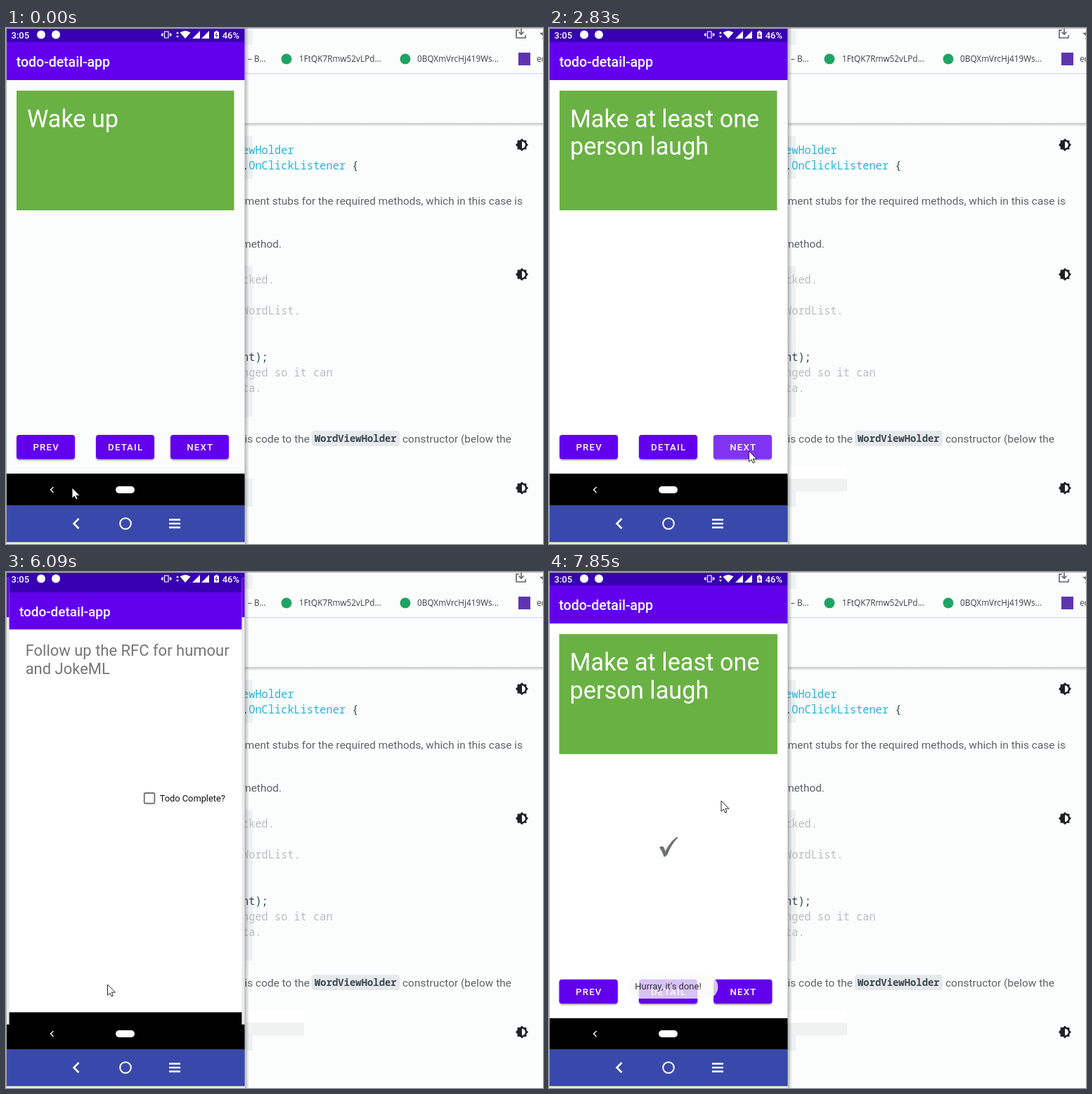
Write an HTML page that moves like this. It is 764 px wide and 733 px high and loops after 8000 ms.

```html
<!DOCTYPE html>
<html lang="en">
<head>
<meta charset="utf-8">
<title>Todo app demo</title>
<style>
  html, body { margin: 0; width: 100%; height: 100%; overflow: hidden; background: #fafdfc; }
  svg { display: block; width: 764px; height: 733px; font-family: Roboto, sans-serif; }
  .body { font-size: 15.45px; fill: #5f6368; }
  .code { font: 500 15.33px "Noto Sans Mono", monospace; fill: #37474f; white-space: pre; }
  .code .type { fill: #27b4dc; }
  .code .note { fill: #b9bdc0; }
  .chip { font-size: 13.9px; font-weight: 600; }
  .tab { font: 11.8px "Open Sans", sans-serif; fill: #3c4043; }
  .title { font-size: 19.5px; font-weight: 500; fill: #fff; }
  .todo { font-size: 34.2px; fill: #fff; }
  .btn text { font-size: 13.2px; font-weight: 500; letter-spacing: 1.18px; text-anchor: middle; fill: #fff; }
  .status { font-size: 13px; font-weight: 500; fill: #fff; }
  .window { transform-origin: 170px 353px; }
  .end { text-anchor: end; }
</style>
</head>
<body>
<svg viewBox="0 0 764 733">
  <defs>
    <clipPath id="glass"><rect x="1" y="1" width="338.5" height="677"/></clipPath>
    <linearGradient id="side"><stop stop-color="#000" stop-opacity=".26"/><stop offset="1" stop-color="#000" stop-opacity="0"/></linearGradient>
    <linearGradient id="under" x2="0" y2="1"><stop stop-color="#000" stop-opacity=".22"/><stop offset="1" stop-color="#000" stop-opacity="0"/></linearGradient>
    <filter id="lift" x="-10%" y="-20%" width="120%" height="160%"><feDropShadow dx="0" dy="1.5" stdDeviation="1.2" flood-opacity=".35"/></filter>
    <path id="contrast" d="M20 15.31 23.31 12 20 8.69V4h-4.69L12 .69 8.69 4H4v4.69L.69 12 4 15.31V20h4.69L12 23.31 15.31 20H20zM12 18V6c3.31 0 6 2.69 6 6s-2.69 6-6 6z" fill="#202124"/>
    <g id="bars">
      <rect y="-60" width="340" height="80" fill="#3700b3"/>
      <rect y="20" width="340" height="54" fill="#6200ee"/>
      <rect y="633" width="340" height="90" fill="#000"/>
      <text class="title" x="14.800" y="54.800">todo-detail-app</text>
    </g>
  </defs>

  <!-- Web page behind the phone -->
  <rect width="764" height="733" fill="#fafdfc"/>
  <rect width="764" height="1" fill="#b4b7b7"/>
  <rect x="330" y="3" width="21" height="21" rx="2" fill="#eff2f3"/>
  <g fill="none" stroke="#5f6368" stroke-width="1.6">
    <path d="M730 3h-4v11h13v-4M733 1v8m-3.500-3.500 3.500 3.500 3.500-3.500"/>
    <path d="m768 3-2 4-5 .6 4 3.400-1 5"/>
  </g>
  <g class="tab">
    <text x="344" y="48">– B...</text>
    <circle cx="399" cy="44" r="7.500" fill="#1fa463"/>
    <text x="417" y="48">1FtQK7Rmw52vLPd...</text>
    <circle cx="568" cy="44" r="7.500" fill="#1fa463"/>
    <text x="585" y="48">0BQXmVrcHj419Ws...</text>
    <rect x="729" y="35" width="17" height="18" fill="#5f35ae"/>
    <text x="755" y="48">ec</text>
  </g>
  <rect x="340" y="64" width="424" height="1.500" fill="#dcdfe4"/>
  <rect x="340" y="135" width="424" height="5" fill="url(#under)"/>
  <g fill="#eef1f3">
    <rect x="330" y="153" width="21" height="61"/>
    <rect x="330" y="338" width="21" height="214"/>
    <rect x="330" y="640" width="21" height="40"/>
  </g>
  <g id="strip">
    <rect x="340" y="622" width="84" height="18.500" fill="#fff"/>
    <rect x="340" y="640.500" width="84" height="18" fill="#f0f2f1"/>
  </g>
  <g class="code">
    <text class="type" x="336" y="178.500">ewHolder</text>
    <text x="336" y="200.500">.<tspan class="type">OnClickListener</tspan> {</text>
    <text class="note" x="336" y="362.500">cked.</text>
    <text class="note" x="336" y="406.500">WordList.</text>
    <text x="336" y="472.500">nt);</text>
    <text class="note" x="336" y="494.500">nged so it can</text>
    <text class="note" x="336" y="516.500">ta.</text>
  </g>
  <g class="body">
    <text class="end" x="735" y="251">ement stubs for the required methods, which in this case is</text>
    <text class="end" x="392" y="312">method.</text>
    <text class="end" x="432" y="588.500">is code to the</text>
    <rect x="435" y="572" width="125" height="22" rx="4" fill="#e6e9eb"/>
    <text class="code chip" x="439" y="588">WordViewHolder</text>
    <text x="564" y="588.500">constructor (below the</text>
  </g>
  <use href="#contrast" transform="translate(724.400 156.400) scale(.8)"/>
  <use href="#contrast" transform="translate(724.400 340.400) scale(.8)"/>
  <use href="#contrast" transform="translate(724.400 643.900) scale(.8)"/>

  <!-- Phone -->
  <rect x="340" width="6" height="733" fill="url(#side)"/>
  <rect y="730" width="340" height="3" fill="url(#under)"/>
  <rect width="340" height="730.500" fill="#a9adad"/>
  <g clip-path="url(#glass)">
    <g id="main" class="window">
      <rect id="paper" width="340" height="640"/>
      <use href="#bars"/>
      <rect x="15" y="89" width="309.500" height="170" fill="#6ab144"/>
      <text class="todo" id="line1" x="30" y="140.500"></text>
      <text class="todo" id="line2" x="30" y="180.300"></text>
      <path id="tick" fill="#6f7070" d="M157 391.500q3-3 5.500-1.500 1.800 2 2.800 6.500 7-13 15.500-19.500l3.500-.5q-9 8-16 25-2.500 3-5 3-1.500-7-6.300-13z"/>
      <g id="buttons"></g>
    </g>
    <rect id="dim" width="340" height="678"/>
    <g id="detail" class="window">
      <rect width="340" height="640" fill="#fff"/>
      <use href="#bars"/>
      <g font-size="22.600" fill="#757575">
        <text x="23.700" y="113">Follow up the RFC for humour</text>
        <text x="23.700" y="139.700">and JokeML</text>
      </g>
      <circle id="halo" cx="205" cy="320.500" r="18" fill="#03dac5" opacity=".2"/>
      <rect id="box" x="197.500" y="313" width="15" height="15" rx="1.500" stroke-width="2"/>
      <path id="boxTick" d="m200 320.500 3.500 3.500 7-7" fill="none" stroke="#fff" stroke-width="2"/>
      <text x="220" y="325.200" font-size="13.200" fill="#111">Todo Complete?</text>
    </g>
    <g id="toast">
      <rect x="113" y="573" width="127.500" height="33" rx="16.500" fill="#fafafa" opacity=".78"/>
      <text x="169.500" y="592.500" font-size="13" text-anchor="middle" fill="#333">Hurray, it's done!</text>
    </g>

    <g class="status">
      <text x="7.500" y="14.500">3:05</text>
      <circle cx="50" cy="9.500" r="6"/>
      <circle cx="71" cy="9.500" r="6"/>
      <path d="M225.500 5h5.500v9h-5.500zM223 7v5m10.500-5v5M221.500 8v3m13.500-3v3" fill="none" stroke="#fff" stroke-width="1.200"/>
      <path d="m244 5 2 3h-4zm0 9-2-3h4zM247.500 6.500q7.500-5 15 0L255 15zM276 4v11h-11zM289 4v11h-11z"/>
      <path d="M298 4h3v1.500h2V15h-7V5.500h2z"/>
      <path d="m300 7-2 3.500h3l-2 3" fill="none" stroke="#3700b3"/>
      <text class="end" x="332" y="14.500">46%</text>
    </g>
    <path d="m67.500 652-4 4 4 4" fill="none" stroke="#fff" stroke-width="1.400"/>
    <rect x="156" y="651" width="27" height="10" rx="5" fill="#fff"/>
  </g>
  <rect x="1" y="678" width="338.500" height="52" fill="#3949ab"/>
  <g fill="none" stroke="#fff" stroke-width="2.500">
    <path d="m103.500 697-7 7 7 7"/>
    <circle cx="170" cy="704" r="7.800" stroke-width="2"/>
    <path d="M232 698.500h16M232 704h16M232 709.500h16"/>
  </g>
  <path id="cursor" d="M0 0V15.200L3.400 12l2.300 5 2.300-1-2.200-4.800H11z" fill="#fff" stroke="#111" stroke-width=".9"/>
</svg>

<script>
const LOOP = 8000;
const $ = id => document.getElementById(id);
const parts = Object.fromEntries(
  [...document.querySelectorAll('svg [id]')].map(el => [el.id, el]));

// Last entry whose start time has been reached.
const at = (track, t) => track.findLast(k => t >= k[0]);

const buttons = [['PREV', 15], ['DETAIL', 128], ['NEXT', 234]];
$('buttons').innerHTML = buttons.map(([label, x]) => `
  <g class="btn">
    <rect x="${x}" y="578" width="83" height="34.500" rx="4" fill="#6200ee" filter="url(#lift)"/>
    <text x="${x + 42.2}" y="600.300">${label}</text>
    <rect class="ripple" x="${x}" y="578" width="83" height="34.500" rx="4" fill="#fff"/>
  </g>`).join('');
const ripples = document.querySelectorAll('.ripple');

// Tap start, button index
const taps = [[1790, 2], [2680, 2], [3420, 2], [4590, 0], [5780, 1]];

const todos = [
  [0, 'Wake up', ''],
  [1940, 'Eat breakfast', ''],
  [2830, 'Make at least one', 'person laugh'],
  [3570, 'Go to sleep', ''],
  [4740, 'Make at least one', 'person laugh']
];

const pointer = [
  [0, 94, 653], [130, 112, 650], [280, 150, 640], [430, 190, 629],
  [570, 226, 619], [720, 255, 611], [860, 272, 606], [1010, 280, 604], [1330, 284.5, 601],
  [3860, 225, 602], [4000, 120, 603], [4150, 68, 603],
  [5050, 70, 599], [5200, 92, 596], [5350, 128, 589], [5500, 144.5, 586],
  [6380, 160, 540], [6530, 195, 450], [6670, 228, 375], [6820, 240.5, 344],
  [6970, 243, 331], [7120, 245, 325]
];

// Time, main scale, dim, detail scale, detail opacity
const windows = [
  [0, 1, 0, 1, 0],
  [5930, 1.01, .04, .9, .5],
  [6090, 1.035, .08, .973, 1],
  [6240, 1, 0, 1, 1],
  [7700, 1.04, 0, .93, .25],
  [7850, 1.003, 0, 1, 0]
];

const show = (el, on) => el.setAttribute('visibility', on ? 'visible' : 'hidden');

function draw(t) {
  const [, x, y] = at(pointer, t);
  parts.cursor.setAttribute('transform', `translate(${x} ${y})`);

  const [, first, second] = at(todos, t);
  parts.line1.textContent = first;
  parts.line2.textContent = second;
  parts.paper.setAttribute('fill', t < 2680 ? '#fafdfc' : '#fff');
  show(parts.strip, t >= 430);

  const tap = at(taps, t);
  const age = tap ? t - tap[0] : LOOP;
  const glow = age < 150 ? .1 : age < 300 ? .2 : 0;
  ripples.forEach((r, i) => r.setAttribute('opacity', tap && tap[1] === i ? glow : 0));

  const [, mainScale, dim, detailScale, alpha] = at(windows, t);
  parts.main.style.transform = `scale(${mainScale})`;
  parts.dim.setAttribute('opacity', dim);
  parts.detail.style.transform = `scale(${detailScale})`;
  parts.detail.setAttribute('opacity', alpha);

  const done = t >= 7400;
  parts.box.setAttribute('fill', done ? '#03dac5' : 'none');
  parts.box.setAttribute('stroke', done ? '#03dac5' : '#757575');
  show(parts.boxTick, done);
  show(parts.halo, done && t < 7700);
  show(parts.tick, done);
  show(parts.toast, t >= 7850);
}

function frame() {
  draw(performance.now() % LOOP);
  requestAnimationFrame(frame);
}
frame();
</script>
</body>
</html>
```
